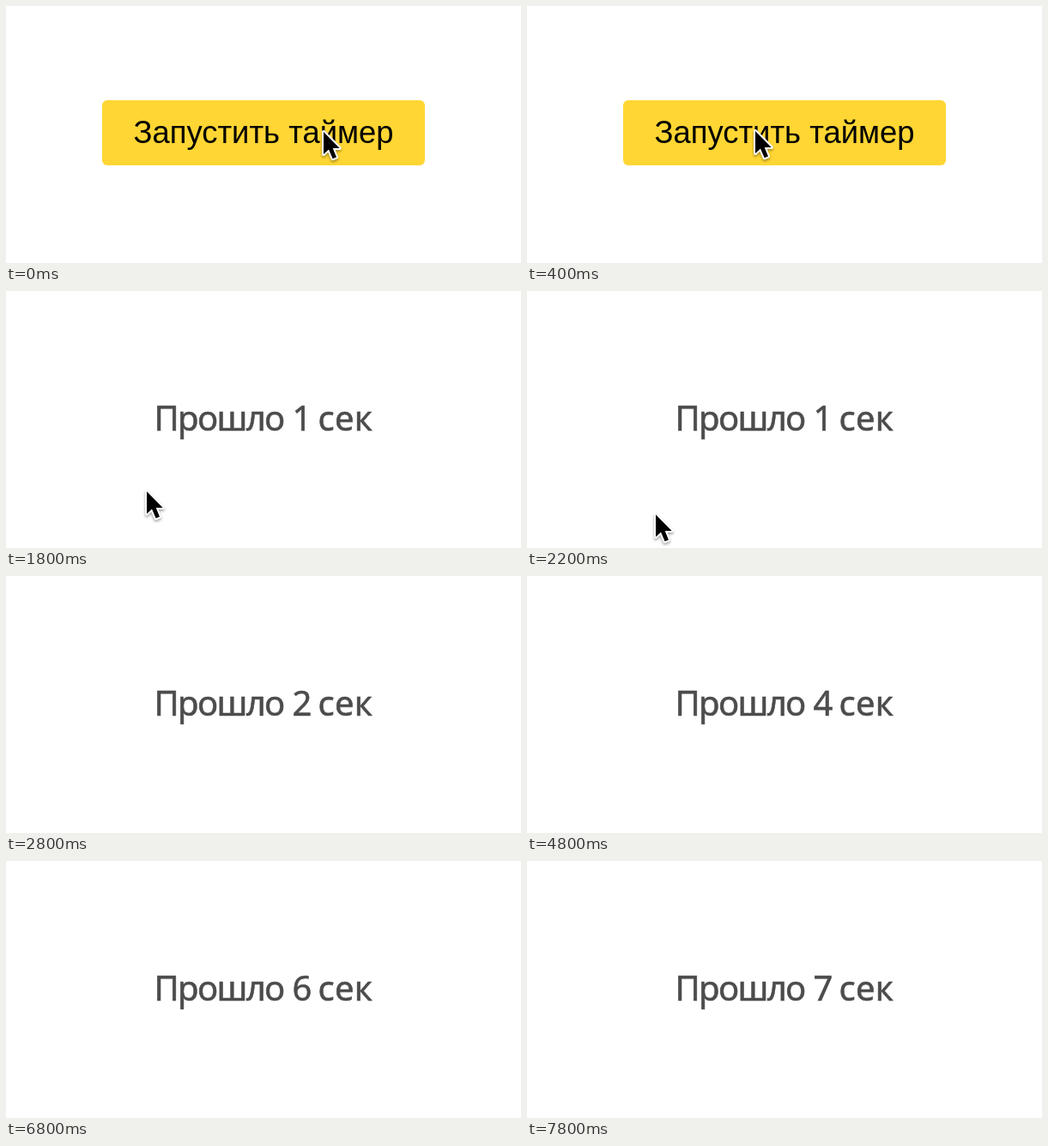
Recreate the animation shown at these times as an HTML page. Size 600 by 300 pixels, loop 8000 ms.

```html
<!DOCTYPE html>
<html lang="ru">
<head>
<meta charset="utf-8">
<title>Таймер</title>
<style>
  html, body { margin: 0; width: 100%; height: 100%; overflow: hidden; background: #fff; }
  svg { display: block; width: 600px; height: 300px; }

  .button, .label, .digit, .cursor { animation: 8s step-end infinite; }

  .button { animation-name: leave; }
  .button rect { fill: #ffd633; }
  .button text { font: 36.4px "Liberation Sans", Arial, sans-serif; text-anchor: middle; }

  .label {
    animation-name: enter;
    fill: #4c4c4c;
    stroke: #4c4c4c;
    stroke-width: .6px;
    font: 40px "Noto Sans", "Open Sans", sans-serif;
  }
  .digit {
    animation-name: tick;
    animation-delay: calc(var(--n) * 1s - 6.2s);
    text-anchor: middle;
  }

  .cursor { animation-name: point; filter: drop-shadow(0 2px 1.5px rgba(0, 0, 0, .35)); }

  @keyframes leave { 0% { opacity: 1 } 22.5%, 100% { opacity: 0 } }
  @keyframes enter { 0% { opacity: 0 } 22.5%, 100% { opacity: 1 } }
  @keyframes tick { 0% { opacity: 1 } 12.5%, 100% { opacity: 0 } }

  /* The pointer is redrawn every 100 ms, 1.25% of the loop. */
  @keyframes point {
    0%     { transform: translate(370px, 147px) }
    1.25%  { transform: translate(352px, 147px) }
    2.5%   { transform: translate(315px, 147px) }
    3.75%  { transform: translate(281px, 146px) }
    5%     { transform: translate(266px, 146px) }
    21.25% { transform: translate(247px, 163px) }
    22.5%  { transform: translate(164px, 234px) }
    23.75% { transform: translate(163px, 241px) }
    25%    { transform: translate(165px, 244px) }
    27.5%  { transform: translate(150px, 261px) }
    28.75% { transform: translate(116px, 291px) }
    30%, 100% { transform: translate(90px, 340px) }
  }
</style>
</head>
<body>
<svg viewBox="0 0 600 300">
  <g class="button">
    <rect x="112" y="110" width="376" height="76" rx="6"/>
    <text x="300" y="160">Запустить таймер</text>
  </g>
  <g class="label">
    <text x="172.5" y="162.5" letter-spacing="-1.7">Прошло</text>
    <text class="digit" style="--n:0" x="345" y="162.5">1</text>
    <text class="digit" style="--n:1" x="345" y="162.5">2</text>
    <text class="digit" style="--n:2" x="345" y="162.5">3</text>
    <text class="digit" style="--n:3" x="345" y="162.5">4</text>
    <text class="digit" style="--n:4" x="345" y="162.5">5</text>
    <text class="digit" style="--n:5" x="345" y="162.5">6</text>
    <text class="digit" style="--n:6" x="345" y="162.5">7</text>
    <text x="363.5" y="162.5" letter-spacing="0.2">сек</text>
  </g>
  <g class="cursor">
    <path d="M0 0V26L6 20.4 10.6 31.3 15 29.5 10.7 19H18.7Z"
          stroke="#fff" stroke-width="4" stroke-linejoin="round" paint-order="stroke"/>
  </g>
</svg>
</body>
</html>
```
